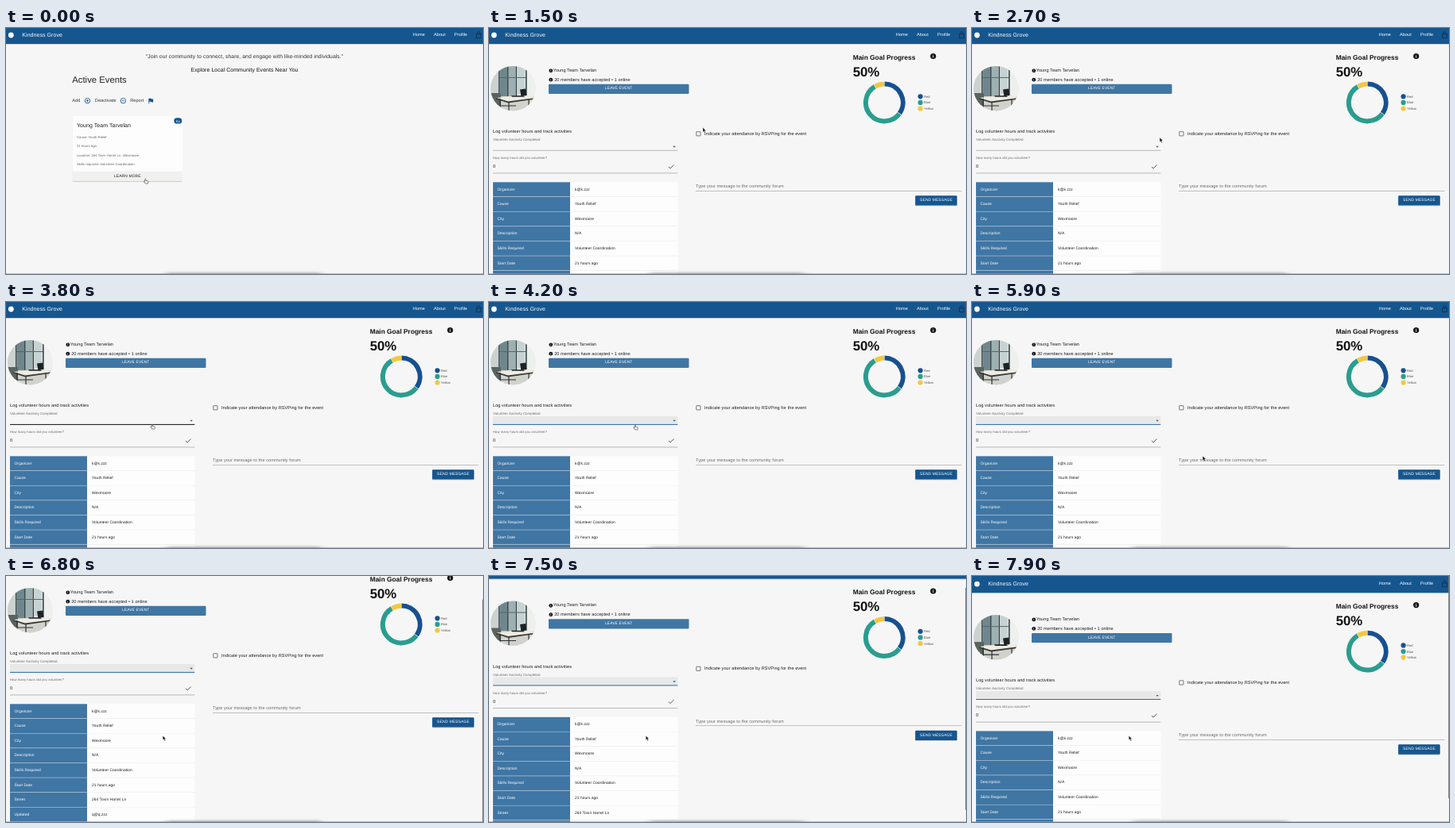
Recreate the animation shown at these times as an HTML page. Size 600 px wide and 310 px high, loop 8000 ms.

```html
<!DOCTYPE html>
<html lang="en">
<head>
<meta charset="utf-8">
<title>Volunteer events</title>
<style>
  html, body { margin: 0; height: 100%; overflow: hidden; background: #f6f6f6; }
  svg { display: block; width: 100vw; height: 100vh; }
  text {
    font-family: "Liberation Sans", Arial, sans-serif;
    letter-spacing: .009em;
    dominant-baseline: central;
    text-rendering: geometricPrecision;
    white-space: pre;
    transform: translateY(.35px);
  }
</style>
</head>
<body>
<svg id="stage" viewBox="0 0 600 310" preserveAspectRatio="none"></svg>
<script>
const LOOP = 8000, STEP = 100;
const NAVY = '#18568f', STEEL = '#4076a4', INK = '#1c1c1c', GREY = '#6b6b6b';
const GROUP = 'Young Team Tarvelan', CITY = 'Wexmoore', STREET = '264 Tovin Harrel Ln';

// y is the middle of the capitals
const text = (x, y, size, str, fill = INK, extra = '') =>
  `<text x="${x}" y="${y}" font-size="${size}" fill="${fill}" ${extra}>${str}</text>`;
const rect = (x, y, w, h, fill, extra = '') =>
  `<rect x="${x}" y="${y}" width="${w}" height="${h}" fill="${fill}" ${extra}/>`;
const circle = (x, y, r, fill, extra = '') =>
  `<circle cx="${x}" cy="${y}" r="${r}" fill="${fill}" ${extra}/>`;
const path = (d, stroke, width, fill = 'none') =>
  `<path d="${d}" stroke="${stroke}" stroke-width="${width}" fill="${fill}"/>`;
const group = (id, body) => `<g id="${id}">${body}</g>`;
const MIDDLE = 'text-anchor="middle"';
const CAPS = MIDDLE + ' style="letter-spacing:.0286em"';
const TIGHT = 'style="letter-spacing:0"';
const BOLD = 'font-weight="700" ' + TIGHT;
const SHADOW = 'filter="url(#shadow)"';

const info = (x, y, r) => circle(x, y, r, '#111') +
  rect(x - r * .13, y - r * .15, r * .26, r * .7, '#fff') +
  rect(x - r * .13, y - r * .55, r * .26, r * .26, '#fff');

function arc(from, to, color) {
  const point = deg => {
    const a = deg * Math.PI / 180;
    return `${497.3 + 23.4 * Math.sin(a)} ${94 - 23.4 * Math.cos(a)}`;
  };
  return path(`M${point(from)}A23.4 23.4 0 ${+(to - from > 180)} 1 ${point(to)}`, color, 6);
}

const defs = `<defs>
  <filter id="shadow" x="-10%" y="-10%" width="120%" height="125%">
    <feDropShadow dx="0" dy=".6" stdDeviation=".6" flood-opacity=".28"/></filter>
  <filter id="blur" x="-10%" y="-200%" width="120%" height="500%"><feGaussianBlur stdDeviation="5 1.5"/></filter>
  <clipPath id="round"><circle cx="30.3" cy="76.2" r="28.3"/></clipPath>
</defs>`;

const header = rect(0, -5, 600, 25, NAVY, SHADOW) +
  circle(6.3, 9, 3.4, '#fff') +
  text(20.3, 9.1, 7, 'Kindness Grove', '#fff') +
  text(511.7, 9, 5.6, 'Home', '#fff') +
  text(538, 9, 5.6, 'About', '#fff') +
  text(564, 9, 5.6, 'Profile', '#fff') +
  path('M591.6 7.7h5.8v4.8h-5.8zM592.8 7.7v-1.2a1.7 1.7 0 0 1 3.4 0v1.2', '#0c2c4c', .8);

const eventsPage =
  rect(511.5, 12.6, 15, 1, '#e8a35c') +
  text(300, 36.5, 6.81, '"Join our community to connect, share, and engage with like-minded individuals."', '#333', MIDDLE) +
  text(300, 53, 6.94, 'Explore Local Community Events Near You', '#111', MIDDLE) +
  text(83.3, 65.5, 11.3, 'Active Events', '#222', TIGHT) +
  text(83.3, 91.4, 5.6, 'Add', '#333') +
  text(111.8, 91.4, 5.6, 'Deactivate', '#333') +
  text(156.2, 91.4, 5.6, 'Report', '#333') +
  circle(102.5, 91.7, 3.2, 'none', `stroke="${NAVY}" stroke-width=".9"`) +
  circle(147.4, 91.7, 3.2, 'none', `stroke="${NAVY}" stroke-width=".9"`) +
  path('M100.8 91.7h3.4M102.5 90v3.4M145.7 91.7h3.4', NAVY, .8) +
  path('M179.4 88.7h3.2l.3.8h2.3v4h-2.6l-.3-.8h-2v2.5h-.9z', 'none', 0, NAVY) +
  rect(83.3, 111, 138.7, 82, '#fdfdfd', 'rx="1.4" ' + SHADOW) +
  rect(83.3, 180.7, 138.7, 12.3, '#f0f0ee') +
  rect(211.3, 113.3, 10, 7.2, NAVY, 'rx="3.6"') +
  text(216.3, 116.8, 4.2, 'Ko', '#fff', MIDDLE) +
  text(89, 123, 7, GROUP) +
  ['Cause: Youth Relief', '21 hours ago', `Location: ${STREET}. ${CITY}`,
    'Skills required: Volunteer Coordination']
    .map((line, i) => text(89, 136.8 + 11.55 * i, 4.2, line, '#666')).join('') +
  text(152.8, 186.7, 4.9, 'LEARN MORE', INK, CAPS);

const photo = `<g clip-path="url(#round)">` +
  rect(2, 47, 57, 59, '#e3e7e5') +
  rect(2, 47, 10, 46, '#cbd2d0') +
  rect(14, 47, 9, 39, '#6f878c') + rect(25, 47, 8, 39, '#9db0b2') + rect(36, 47, 9, 36, '#c6d3d3') +
  [12, 23, 33.5, 46].map(x => rect(x, 47, 1.6, 42, '#39464a')).join('') +
  rect(13, 62, 33, 1, '#56666a') +
  rect(48, 47, 12, 40, '#eef0ee') +
  rect(2, 86, 58, 20, '#d2d2cd') +
  rect(2, 82, 13, 16, '#59635f') +
  path('M9 88L50 84.5L59 88L24 92.5Z', 'none', 0, '#efebe2') +
  path('M24 92.5L59 88v1.6L24 94.5L9 89.6V88z', 'none', 0, '#3a3a37') +
  path('M39 77.5l7-1l1.4 8.5l-7 1zM28 85.2h15l2 1.6H29z', 'none', 0, '#1d2224') +
  path('M14 89v14M25 94v12M50 90v13M14 98h20', '#2b3234', 1.2) + '</g>';

const tableRows = [
  ['Organizer', 'k@k.zzz'], ['Cause', 'Youth Relief'], ['City', CITY], ['Description', 'N/A'],
  ['Skills Required', 'Volunteer Coordination'], ['Start Date', '21 hours ago'],
  ['Street', STREET], ['Updated', 'q@q.zzz']
].map(([key, value], i) => {
  const y = 194.3 + 18.6 * i;
  return rect(5, y, 97, 18.2, STEEL) + rect(102, y, 135.5, 18.2, '#fdfdfd') +
    rect(5, y + 18.2, 97, .4, '#b9cbda') + rect(102, y + 18.2, 135.5, .4, '#dedede') +
    text(10.5, y + 9.4, 4.9, key, '#fff') + text(108, y + 9.4, 4.9, value);
}).join('');

const legend = [['Red', '#17508f'], ['Blue', '#2a9d8f'], ['Yellow', '#f3c73f']]
  .map(([label, color], i) => circle(542.6, 86.3 + 7.6 * i, 3.1, color) +
    text(547, 86 + 7.6 * i, 4.1, label, '#555')).join('');

const detailPage = photo +
  info(77.8, 53.8, 2.4) + text(80.7, 53.6, 5.6, GROUP) +
  info(77.8, 65.2, 2.4) + text(82.2, 65.2, 5.6, '20 members have accepted • 1 online') +
  rect(75, 70.8, 176.5, 12.2, STEEL, 'rx="1"') +
  text(163.2, 76.6, 4.9, 'LEAVE EVENT', '#fff', CAPS) +
  text(457.7, 36.6, 8.4, 'Main Goal Progress', '#111', BOLD) +
  text(457.7, 55, 16.8, '50%', '#111', BOLD) +
  info(558.7, 35.5, 3.6) +
  arc(.8, 125, '#17508f') + arc(126.5, 329, '#2a9d8f') + arc(330.5, 359.2, '#f3c73f') + legend +
  text(5, 131, 5.6, 'Log volunteer hours and track activities') +
  rect(5, 144, 232.3, 10, '#e8e8e8', 'id="selectFill"') +
  text(5, 140.3, 4.4, 'Volunteer Aactivity Completed', GREY) +
  rect(5, 153.9, 232.3, .5, '#777', 'id="selectLine"') +
  path('M231.3 148.8h3.6l-1.8 1.9z', 'none', 0, '#555') +
  text(5, 163.2, 4.2, 'How many hours did you volunteer?', GREY) +
  text(5, 174.9, 5.6, '0') +
  path('M226 174.9l2.1 2.1l4.4-4.5', '#333', .8) +
  rect(5, 182.7, 232.3, .5, '#777') +
  tableRows +
  rect(260.8, 130.7, 5.2, 5.2, 'none', 'rx=".3" stroke="#444" stroke-width=".7"') +
  text(271, 133.3, 5.6, 'Indicate your attendance by RSVPing for the event') +
  text(260, 200, 5.6, 'Type your message to the community forum', GREY) +
  rect(260, 205, 334.5, .5, '#888') +
  rect(536.2, 211.2, 52.5, 12.4, NAVY, 'rx="1.2" ' + SHADOW) +
  text(562.5, 217.3, 4.9, 'SEND MESSAGE', '#fff', CAPS);

const activities = ['Food Drive', 'Community Clean-Up', 'Mentorship Program', 'Senior Companion',
  'Environmental Conservation', 'Homeless Shelter Support', "Children's Hospital Activities",
  'Tutoring and Education', 'Animal Shelter Assistance', 'Disaster Relief', 'Soup Kitchen Help',
  'Blood Donation', 'Library Volunteering', 'Elderly Care Visits', 'Crisis Hotline Support',
  'Park Restoration', 'Youth Sports Coaching', 'Community Garden Care', 'Plates on Bikes',
  'Charity Run/Walk', 'Veterans Support', 'Beach Cleanup'];
const list = rect(5, 25.6, 232.7, 282, '#fdfdfd', 'rx="1.4" filter="url(#shadow)"') +
  activities.map((name, i) => text(10.6, 34.6 + 12.62 * i, 5.6, name)).join('');

const arrow = path('M0 0v5.4l1.2-1l1 2.1l1-.4l-1-2.1h1.7z', '#fff', .3, '#111');
const hand = path('M-.6 .6q.6-.9 1.1 0v1.7l2.4.6q.5.2.4.9l-.5 2.2h-3.1l-2-2.6q0-.8.8-.5l.9.6z', '#222', .55, '#fff');

const stage = document.getElementById('stage');
stage.innerHTML = defs + rect(0, 0, 600, 310, '#f6f6f6') +
  group('page', group('events', eventsPage) + group('detail', detailPage) + header) +
  group('list', list) +
  rect(202, 308.5, 194, 4, '#555', 'filter="url(#blur)" opacity=".5"') +
  rect(0, 309.4, 600, .6, '#9a9a9a') +
  rect(599.2, 0, .8, 280, '#777', 'id="scrollbar"') +
  group('arrow', arrow) + group('hand', hand);

const part = Object.fromEntries([...stage.querySelectorAll('[id]')].map(el => [el.id, el]));
const set = (name, attrs) => Object.entries(attrs).forEach(([k, v]) => part[name].setAttribute(k, v));
const show = (name, on) => set(name, { display: on ? 'inline' : 'none' });

// Keys are [time, ...values], eased between neighbours
const pointerKeys = [[500, 175.5, 190], [800, 178, 188], [1500, 269, 125.5], [2300, 262, 131],
  [3200, 200, 148], [3800, 184, 154], [4200, 184, 155], [5100, 290.7, 174], [5300, 290.7, 174],
  [5900, 290.2, 194], [6400, 197.3, 201.2]];
const scrollKeys = [[6400, 0], [6700, 33], [7300, 33], [7700, 0], [7800, -2], [7900, -1.1]];
const listKeys = [[4200, 0], [4500, 1], [5400, 1], [5700, 0]];

function sample(keys, t) {
  const next = keys.findIndex(key => key[0] > t);
  if (next === 0) return keys[0].slice(1);
  if (next < 0) return keys[keys.length - 1].slice(1);
  const a = keys[next - 1], b = keys[next];
  const p = (t - a[0]) / (b[0] - a[0]), eased = p * p * (3 - 2 * p);
  return a.slice(1).map((v, i) => v + (b[i + 1] - v) * eased);
}

function draw(t) {
  const [x, y] = sample(pointerKeys, t);
  const [scroll] = sample(scrollKeys, t);
  const [open] = sample(listKeys, t);
  const onDetail = t >= 700, focused = t >= 4200;
  const overSelect = onDetail && x < 237 && y > 143 && y < 156;

  show('events', !onDetail);
  show('detail', onDetail);
  set('page', { transform: `translate(0 ${-scroll})` });

  show('selectFill', focused);
  set('selectLine', {
    height: focused || overSelect ? 1 : .5,
    fill: focused ? '#2868a8' : overSelect ? '#111' : '#777'
  });

  const grow = .75 + .25 * open;
  set('list', {
    opacity: open,
    transform: `translate(121 167) scale(${grow} ${grow * grow}) translate(-121 -167)`
  });

  show('scrollbar', t >= 6400);
  set('scrollbar', { y: Math.max(0, scroll) * .9 });

  const pointing = !onDetail || overSelect || (open > 0 && x < 238);
  show('hand', pointing);
  show('arrow', !pointing);
  set(pointing ? 'hand' : 'arrow', { transform: `translate(${x} ${y})` });
}

const start = performance.now();
function tick() {
  const t = (performance.now() - start) % LOOP;
  draw(Math.floor(t / STEP) * STEP);
  requestAnimationFrame(tick);
}
tick();
</script>
</body>
</html>
```
